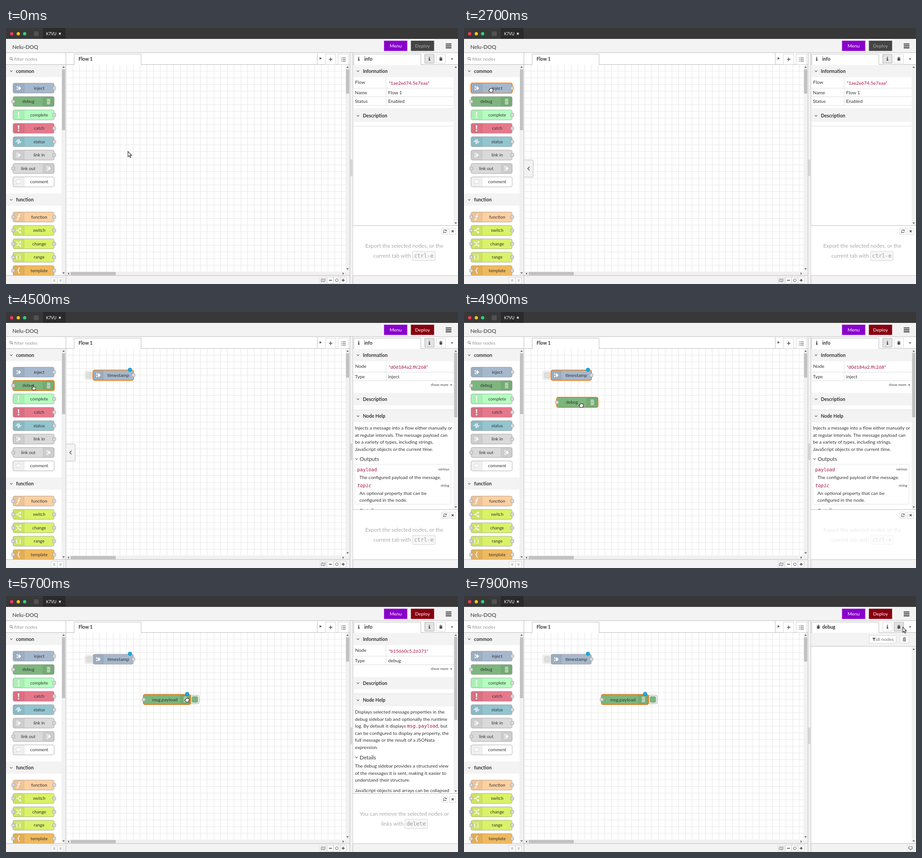
An HTML page for the animation above (8 s loop, 993 by 564 pixels).

```html
<!DOCTYPE html>
<html lang="en">
<head>
<meta charset="utf-8">
<title>Flow editor</title>
<style>
html, body { margin: 0; width: 100%; height: 100%; overflow: hidden; background: #fff; }
svg { display: block; width: 100vw; height: 100vh; }
text { font-family: Lato, sans-serif; white-space: pre; }
.mono { font-family: "DejaVu Sans Mono", monospace; }
</style>
</head>
<body>
<svg viewBox="0 0 993 564"><g id="base"></g><g id="live"></g></svg>
<script>
const BAR = '#f3f3f3', LINE = '#bbb', ORANGE = '#f07a10', RED = '#a5103a', CELL = 14.75;
const range = n => [...Array(n).keys()];
const at = (x, y, s) => `<g transform="translate(${x} ${y})">${s}</g>`;
const rect = (x, y, w, h, fill, more = '') => `<rect x="${x}" y="${y}" width="${w}" height="${h}" fill="${fill}" ${more}/>`;
const box = (x, y, w, h, fill = '#fff', stroke = '#ccc', r = 0, sw = .8) => rect(x, y, w, h, fill, `rx="${r}" stroke="${stroke}" stroke-width="${sw}"`);
const path = (d, stroke = '#555', w = 1, fill = 'none') => `<path d="${d}" fill="${fill}" stroke="${stroke}" stroke-width="${w}"/>`;
const solid = (d, fill = '#555') => path(d, 'none', 0, fill);
const disc = (x, y, r, fill, stroke = 'none') => `<circle cx="${x}" cy="${y}" r="${r}" fill="${fill}" stroke="${stroke}"/>`;
// y is the vertical middle of the capitals
const text = (x, y, s, size = 10.33, fill = '#333', more = '') =>
  `<text x="${x}" y="${y + size * .36}" font-size="${size}" fill="${fill}" ${more}>${s}</text>`;
const MID = 'text-anchor="middle"', END = 'text-anchor="end"', BOLD = 'font-weight="700"', MONO = 'class="mono"';
const bold = (x, y, s) => text(x, y, s, 10.33, '#333', BOLD);
const chevron = (x, y) => path(`M${x - 2.6} ${y - 1.5}l2.6 2.8 2.6-2.8`, '#444', 1.1);
const caret = (x, y, dir = 1, fill = '#555', r = 2.8) => solid(`M${x - r} ${y - dir * r / 2}h${2 * r}l${-r} ${dir * r}z`, fill);
const sideCaret = (x, y, dir) => solid(`M${x - dir * 1.4} ${y - 2.8}v5.6l${dir * 2.8} -2.8z`);

const icons = {
  inject: solid('M-4-4.5h2v2.3h2.6v-2.8L5.5 0 .6 5V2.2H-2v2.3h-2V1.3h3.6V-1.3H-4z', '#fff'),
  debug: path('M-3.7-5.2h7.4M-3.7-2.6h7.4M-3.7 0h7.4M-3.7 2.6h7.4M-3.7 5.2h7.4', '#fff', 1.1),
  alert: solid('M-1.5-6.5h3L.8 2.3H-.8zM-1.4 3.7h2.8v2.7h-2.8z', '#fff'),
  status: path('M-7 0h3l1.4-4L-.6 5.5 1-6 2.8 3 4 0h3', '#fff', 1.2),
  link: solid('M-4.5-5h4v1.3h-2.7v2.4H0V-4.4L5 0 0 4.4V1.3h-3.2v2.4h2.7V5h-4V1.3h2V-1.3h-2z', '#fff'),
  comment: path('M-3.6 2.8C-8-.5-5-4.4 0-4.4S7.2-.6 4.5 1.7C3 3.2 0 3.4-2 3.2L-5 5z', '#ccc', .9, '#fff'),
  fn: path('M4.3-5.4C2.4-7 1-6 .6-3.6L-1 4C-1.5 6.4-3 6.5-4.4 5.5M-2.6-1.4h5.8', '#fff', 1.6),
  switch: path('M-6 0h3.5C0 0-1-4 2.5-4H5M-2.5 0C0 0-1 4 2.5 4H5M2.6-6.2L5.2-4 2.6-1.8M2.6 1.8L5.2 4 2.6 6.2', '#fff', 1.4),
  change: path('M-6-4h2.5C0-4-.5 4 3 4h2.5M-6 4h2.5C-1 4-1 1 0-.5M1-2.3C1.6-3.6 2.2-4 3-4h2.5M3-6.2L5.6-4 3-1.8M3 1.8L5.6 4 3 6.2', '#fff', 1.3),
  range: path('M-4-2.5V5.5M-4-5.5v1.6M3.5-2.5V5.5M3.5-5.5v1.6M-1-5.2h1.6M-1 5h1.6M-5.5-2h1.5M2-2h1.5', '#fff', 1.5),
  template: path('M2.6-6.2C-.8-6.2.8-2-.6-.8L-2 0-.6.8C.8 2-.8 6.2 2.6 6.2', '#fff', 1.5)
};

// name, colour, icon, middle y, ports (l, r), icon on the right
const palette = [
  ['inject', '#a6b8cd', 'inject', 132.5, 'r'],
  ['debug', '#7cb67d', 'debug', 162, 'l', true],
  ['complete', '#b4ffc0', 'alert', 191.5, 'r'],
  ['catch', '#e6788b', 'alert', 221, 'r'],
  ['status', '#92c5d0', 'status', 250.5, 'r'],
  ['link in', '#dadada', 'link', 280, 'r'],
  ['link out', '#dadada', 'link', 309.5, 'l', true],
  ['comment', '#fff', 'comment', 339, ''],
  ['function', '#fdd0a0', 'fn', 416.5, 'lr'],
  ['switch', '#daf268', 'switch', 446, 'lr'],
  ['change', '#daf268', 'change', 475.5, 'lr'],
  ['range', '#daf268', 'range', 505, 'lr'],
  ['template', '#f0b95e', 'template', 534.5, 'lr']
];

const port = (x, y) => box(x - 3.6, y - 3.6, 7.2, 7.2, '#d9d9d9', '#999', 2);

// node body centred on 0,0
function body(label, color, icon, ports, right, w, iconW, size, lit) {
  const l = -w / 2, r = w / 2, ix = right ? r - iconW : l;
  return box(l, -11, w, 22, color, '#999', 3.7)
    + rect(ix + .4, -10.6, iconW - .4, 21.2, '#000', 'opacity=".06" rx="3"')
    + path(`M${right ? ix : ix + iconW} -10.6v21.2`, 'rgba(0,0,0,.12)', .8)
    + at(ix + iconW / 2, 0, icons[icon])
    + text(right ? -iconW / 2 + .5 : iconW / 2, 0, label, size, '#333', MID)
    + (lit ? box(l - .3, -11.3, w + .6, 22.6, 'none', ORANGE, 4, 1.6) : '')
    + [...ports].map(p => port(p == 'l' ? l + .5 : r, 0)).join('');
}
const chip = ([name, color, icon, , ports, right], lit) => body(name, color, icon, ports, right, 90.5, 24.5, 9.6, lit);

const miniButton = (x, y, icon, w = 13.5) => box(x, y, w, 13.5) + at(x + w / 2, y + 6.75, icon);
const vScroll = (x, top, bottom) => rect(x - 4.5, top, 9, bottom - top, '#f1f1f1')
  + caret(x, top + 5, -1) + caret(x, bottom - 5);
const bug = solid('M-2.4-1.8h4.8V2Q2 4.4 0 4.4T-2.4 2zM-1.9-2.4Q-1.7-4.4 0-4.4T1.9-2.4z', '#444')
  + path('M-4.4.8h8.8M-3.8-3.4L-2-1.6M3.8-3.4L2-1.6M-3.8 4.2L-2 2.6M3.8 4.2L2 2.6', '#444', .9);
const info = solid('M-1.7-1.4H1V2.6h.9V4h-3.8V2.6h.9V0h-.7zM-1-4.3H1v1.9h-2z', '#444');

function base() {
  const grid = range(41).map(i => `M${132.3 + CELL * (i + 1)} 81v455`).join('')
    + range(30).map(i => `M133 ${80.3 + CELL * (i + 1)}h613`).join('');
  return rect(0, 0, 993, 564, '#fff')
    // title bar
    + rect(0, 0, 993, 24, '#383838') + rect(81, 0, 50, 24, '#2a2a2a')
    + disc(12.5, 12.7, 3.6, '#f2385a') + disc(27, 12.7, 3.6, '#f5c518') + disc(41, 12.7, 3.6, '#33d17a')
    + [62, 67.3].map(x => [8.3, 13.5].map(y => box(x, y, 3.5, 3.5, 'none', '#777')).join('')).join('')
    + text(88, 12.6, 'K7VU', 8.6, '#fff') + path('M116.3 10.6l4 4M120.3 10.6l-4 4', '#fff', 1.4)
    // header
    + rect(0, 24, 993, 30, BAR) + text(14, 42, 'Nelu-DOQ', 11.8)
    + rect(830.5, 28, 51, 22.5, '#8a00cc') + text(856, 39.3, 'Menu', 10.33, '#fff', MID)
    + path('M966 35.2h12.6M966 39.4h12.6M966 43.6h12.6', '#333', 2.1)
    // palette
    + disc(11, 67, 2.5, 'none', '#777') + path('M12.8 69l2.3 2.3', '#777', 1.3)
    + text(18, 68, 'filter nodes', 10.33, '#999')
    + [['common', 95], ['function', 378.5]].map(([s, y]) => rect(0, y - 14, 122, 27, BAR) + chevron(11.5, y) + bold(22, y, s)).join('')
    + palette.map(p => at(60.6, p[3], chip(p))).join('')
    + vScroll(126.5, 81, 545) + rect(123, 91, 7, 134, '#c1c1c1')
    // workspace
    + path(grid, '#e7e7e7', 1.1)
    + vScroll(750.5, 81, 536) + rect(747, 91, 7, 53.5, '#c1c1c1')
    + rect(133, 536.5, 622, 8.5, '#f1f1f1') + rect(142, 537.5, 99, 7, '#c1c1c1')
    + sideCaret(137, 541, -1) + sideCaret(741, 541, 1)
    + path('M132 80.5h18M297 80.5h458M684 55v25', LINE)
    + path('M149.8 81V57.7h147V81', LINE) + bold(159.5, 68, 'Flow 1')
    + sideCaret(691.3, 67, 1.7) + box(701.5, 57.5, 23, 23) + path('M709.5 69h7.6M713.3 65.2v7.6', '#555', 1.6)
    + box(729.5, 57.5, 23, 23) + path('M736 65.5h1.8M736 69.2h1.8M736 72.9h1.8M739 65.5h7.5M739 69.2h7.5M739 72.9h7.5', '#555', 1.2)
    + rect(756, 55, 5.5, 509, BAR) + box(757.3, 290, 2.6, 36, '#ddd', '#bbb', 1)
    // footers
    + rect(0, 545, 993, 19, BAR)
    + path('M0 54.3h993M0 80.5h131.5M131.7 54v510M755.7 54v510M762 54v510M0 545.3h755.5M762 545.3h231', LINE)
    + miniButton(99, 549.5, path('M-2-.3l2-2 2 2M-2 2.5l2-2 2 2', '#555', .9))
    + miniButton(113, 549.5, path('M-2-2.3l2 2 2-2M-2 .5l2 2 2-2', '#555', .9))
    + miniButton(690, 549, path('M-4.3-2.5l2.8-1.2 3 1.2 2.8-1.2V2.6L1.5 3.8l-3-1.2-2.8 1.2zM-1.5-3.7v6.3M1.5-2.5v6.3', '#555', .8))
    + miniButton(706, 549, path('M-3.3 0h6.6', '#555', 1.8))
    + miniButton(720, 549, disc(0, 0, 3.1, 'none', '#555'))
    + miniButton(734, 549, path('M-3.3 0h6.6M0-3.3v6.6', '#555', 1.8));
}

// sidebar
const head = (y, s) => rect(762.5, y - 13.5, 220.5, 27, BAR) + chevron(773.3, y) + bold(784, y, s);
const lines = (x, y, gap, list) => list.map((s, i) => text(x, y + gap * i, s)).join('');
const table = (first, id, rows) => text(767, 119, first) + text(841, 121, `"${id}"`, 10.33, RED)
  + rows.map(([k, v], i) => text(766.5, 142 + 19.3 * i, k) + text(839.5, 142 + 19.3 * i, v)).join('')
  + path(`M763 132.5h220M835 109V${132 + 19.3 * rows.length}` + rows.map((_, i) => `M763 ${151.5 + 19.2 * i}h220`).join(''), '#ddd');
const nodeInfo = (id, type) => table('Node', id, [['Type', type]])
  + text(972, 160.5, 'show more', 8, '#444', END) + caret(978, 161, 1, '#444', 2.5)
  + head(192, 'Description') + path('M763 215.5h220', '#ddd') + head(229.5, 'Node Help');
const subHead = (y, s) => chevron(770, y) + text(777, y, s, 11.8);

const panels = {
  flow: table('Flow', '1ae2e674.5e7eaa', [['Name', 'Flow 1'], ['Status', 'Enabled']])
    + path('M763 178.5h220M763 216h220', '#ddd') + head(193.5, 'Description'),
  inject: nodeInfo('d0d184a2.ffc268', 'inject')
    + lines(766.5, 255.3, 15.5, ['Injects a message into a flow either manually or', 'at regular intervals. The message payload can',
      'be a variety of types, including strings,', 'JavaScript objects or the current time.'])
    + subHead(324, 'Outputs') + box(766.5, 335.5, 211, 88, '#fff', '#ddd', 1)
    + text(771.5, 347, 'payload', 10.33, RED, MONO) + text(771.5, 382, 'topic', 10.33, RED, MONO + ' font-style="italic"')
    + text(974, 346.5, 'various', 8.1, '#444', END + ' font-style="italic"') + text(974, 382, 'string', 8.1, '#444', END + ' font-style="italic"')
    + lines(776.5, 364, 0, ['The configured payload of the message.'])
    + lines(776.5, 399.5, 14.7, ['An optional property that can be', 'configured in the node.'])
    + subHead(438, 'Details') + rect(984.5, 90, 7, 142, '#c1c1c1'),
  debug: nodeInfo('b15660c5.26371', 'debug')
    + lines(766.5, 255.3, 15.55, ['Displays selected message properties in the', 'debug sidebar tab and optionally the runtime',
      `log. By default it displays <tspan ${MONO} fill="${RED}">msg.payload</tspan>, but`, 'can be configured to display any property, the',
      'full message or the result of a JSONata', 'expression.'])
    + subHead(355.5, 'Details')
    + lines(766.5, 374.7, 15.5, ['The debug sidebar provides a structured view', 'of the messages it is sent, making it easier to', 'understand their structure.'])
    + lines(766.5, 428, 0, ['JavaScript objects and arrays can be collapsed'])
    + rect(984.5, 90, 7, 183, '#c1c1c1')
};

function tip(first, second, x, key, keyX, alpha) {
  const grey = '#aaa';
  return `<g opacity="${alpha}">` + text(875, 480, first, 11.8, grey, MID) + text(x, 502, second, 11.8, grey)
    + box(keyX, 492, 50, 20.5, '#f7f7f7', '#ccc', 2) + text(keyX + 25, 502, key, 11.8, '#999', MID + ' ' + MONO) + '</g>';
}

const clamp = v => Math.max(0, Math.min(1, v));

function sidebar(t) {
  const log = t >= 7900, panel = t < 3400 ? 'flow' : t < 5700 ? 'inject' : 'debug';
  const tabs = path('M762 80.5h2M911.5 80.5H993', LINE) + path('M764 81V57.7h147.5V81', LINE)
    + at(log ? 778.5 : 775, 68, log ? bug : info) + bold(787, 68, log ? 'debug' : 'info')
    + box(920, 58, 20.5, 19.5, log ? '#fff' : '#e4e4e4', log ? '#ccc' : '#999') + at(930.3, 68, info)
    + box(945, 58, 20.5, 19.5, log ? '#e4e4e4' : '#fff', log ? '#999' : '#ccc') + at(955.3, 68, bug) + caret(980, 68.5);
  if (log) return tabs + rect(762.5, 81, 231, 29.5, BAR) + path('M762 110.8h231', LINE)
    + box(890.5, 87, 59, 17) + solid('M897 92h7.4l-2.8 3.4v4.2l-1.8-1.4v-2.8z') + text(904, 95.5, 'all nodes', 10.33, '#777')
    + box(957.5, 87, 20, 17) + path('M964 93h7M966.3 93v-1.4h2.4V93M964.8 93.5v6h5.4v-6M966.6 94.5v4M968.4 94.5v4', '#555', 1)
    + vScroll(988, 112, 545) + miniButton(974, 549, path('M-3.8-3.5h7.6V1.5h-7.6zM-2 3.5h4', '#555', 1.2), 14);
  return tabs + vScroll(988, 81, 435) + head(95, 'Information') + panels[panel]
    + rect(762.5, 435, 231, 110, '#fff') + path('M762 435.3h231', LINE)
    + miniButton(957.5, 441, path('M-3.2-.6A3.3 3.3 0 0 1 2.6-2M3.2.6A3.3 3.3 0 0 1-2.6 2M3.2-3.6v2.4H.8M-3.2 3.6V1.2h2.4', '#555', 1.1))
    + miniButton(974.5, 441, path('M-2.2-2.2l4.4 4.4M2.2-2.2l-4.4 4.4', '#555', 1.7))
    + (t < 5000 ? tip('Export the selected nodes, or the', 'current tab with', 807, 'ctrl-e', 893, 1 - clamp((t - 4600) / 400))
      : tip('You can remove the selected nodes or', 'links with', 824.5, 'delete', 876, clamp((t - 5000) / 500)));
}

// start, end, x, y, shape: moves during start..end, then rests
const moves = [
  [0, 0, 268, 272, 'arrow'], [500, 500, 268, 272.5, 'cross'], [1300, 1400, 297.5, 287.5, 'cross'],
  [1600, 1700, 197.5, 208.5, 'cross'], [2100, 2300, 60, 137, 'hand'], [2700, 2700, 59, 137, 'fist'],
  [2900, 3400, 246, 139, 'fist'], [3700, 3800, 156.5, 160.5, 'cross'], [4000, 4200, 61, 167, 'hand'],
  [4600, 5200, 385, 231, 'fist'], [5300, 5500, 368, 231, 'fist'], [5700, 5700, 397.5, 229, 'fist'],
  [6000, 6000, 397.5, 229, 'cross'], [6200, 6300, 762, 99, 'arrow'], [6500, 6900, 902, 71, 'hand'],
  [7000, 7300, 934, 70, 'hand'], [7500, 7600, 964, 68.5, 'arrow']
];
const plus = 'M-6 0H6M0-6V6';
const cursors = {
  arrow: path('M0 0V11.6L2.7 9.2 4.6 13.2 6.5 12.3 4.7 8.4H8.2z', '#222', 1.1, '#fff'),
  cross: path(plus, '#fff', 2.6) + path(plus, '#222', 1.1),
  hand: path('M-3.4-4.8Q-2.4-6-1.4-4.8L-.9-1.8 2.6-1.3Q4.6-.9 4.4 1L3.6 4.8H-1.8L-4.4 1.8Q-4.6.3-2.6.8z', '#222', 1.1, '#fff'),
  fist: path('M-2.8-1.6Q-2.6-4-1-3.5 0-4.5 1.2-3.6 2.4-4 3-3 4.9-3.2 4.8-1L3.9 4.2H-2L-4.8 1Q-4.8-.8-2.8-.4z', '#222', 1.1, '#fff')
};

function pointer(t) {
  const i = moves.findLastIndex(m => t >= m[0]), [from, to, x, y, shape] = moves[i];
  const [, , px, py] = moves[Math.max(0, i - 1)];
  const p = clamp((t - from + 100) / (to - from + 100)), e = p * p * (3 - 2 * p);
  const cx = px + (x - px) * e, cy = py + (y - py) * e;
  const kind = shape != 'hand' ? shape : cx > 755 ? (cy > 82 ? 'arrow' : shape) : cx > 132 ? 'cross' : shape;
  return { x: cx, y: cy, kind };
}

const changed = (x, y) => disc(x, y, 3.9, '#1aaee8', '#0a86b8');

function flowNodes(t) {
  let s = '';
  if (t >= 3400) s += box(173, 130, 18, 19, '#f3f3f3', '#ddd', 3) + box(176, 133, 12.5, 13, '#dcdfdc', '#ccc', 2.5)
    + at(235.6, 139.3, body('timestamp', '#a6b8cd', 'inject', 'r', false, 88.5, 22, 10.33, t < 5700)) + changed(272.3, 127.2);
  if (t >= 5700) s += box(406, 218.5, 18.5, 19, '#f0f0f0', '#999', 3) + box(408.7, 221.5, 12.5, 13, '#7cb67d', '#6a9a6b', 2.5)
    + at(353.6, 228, body('msg.payload', '#7cb67d', 'debug', 'l', true, 103.25, 22, 10.33, true)
      .replace('x="-10.5"', 'x="-4.5"')) + changed(398, 215.7);
  return s;
}

function live(t) {
  const within = (a, b) => t >= a && t < b, c = pointer(t), [inject, debug] = palette;
  const ready = t >= 3400;
  let s = rect(889.5, 28, 51, 22.5, ready ? '#870010' : '#444') + text(915, 39.3, 'Deploy', 10.33, ready ? '#fff' : '#aaa', MID);
  s += flowNodes(t) + sidebar(t);
  if (within(2200, 2900)) s += at(60.6, 132.5, chip(inject, true));
  if (within(4100, 4600)) s += at(60.6, 162, chip(debug, true));
  if (within(2200, 3000) || within(4100, 4700))
    s += path('M132 290.7h17.5q2.5 0 2.5 2.5v32.6q0 2.5-2.5 2.5H132', LINE, 1, BAR) + path('M144 305.5l-4 4.2 4 4.2', '#444', 1.3);
  if (within(2900, 3400)) s += at(c.x - 9, c.y - 4, chip(inject, true));
  if (within(4600, 5700)) s += at(c.x - 8.6, c.y - 6.8, chip(debug, true));
  return s + at(c.x, c.y, cursors[c.kind]);
}

const $ = id => document.getElementById(id);
$('base').innerHTML = base();
let shown = -1;
const start = performance.now();
function frame() {
  const t = Math.floor((performance.now() - start) % 8000 / 100) * 100;
  if (t != shown) $('live').innerHTML = live(shown = t);
  requestAnimationFrame(frame);
}
frame();
</script>
</body>
</html>
```
